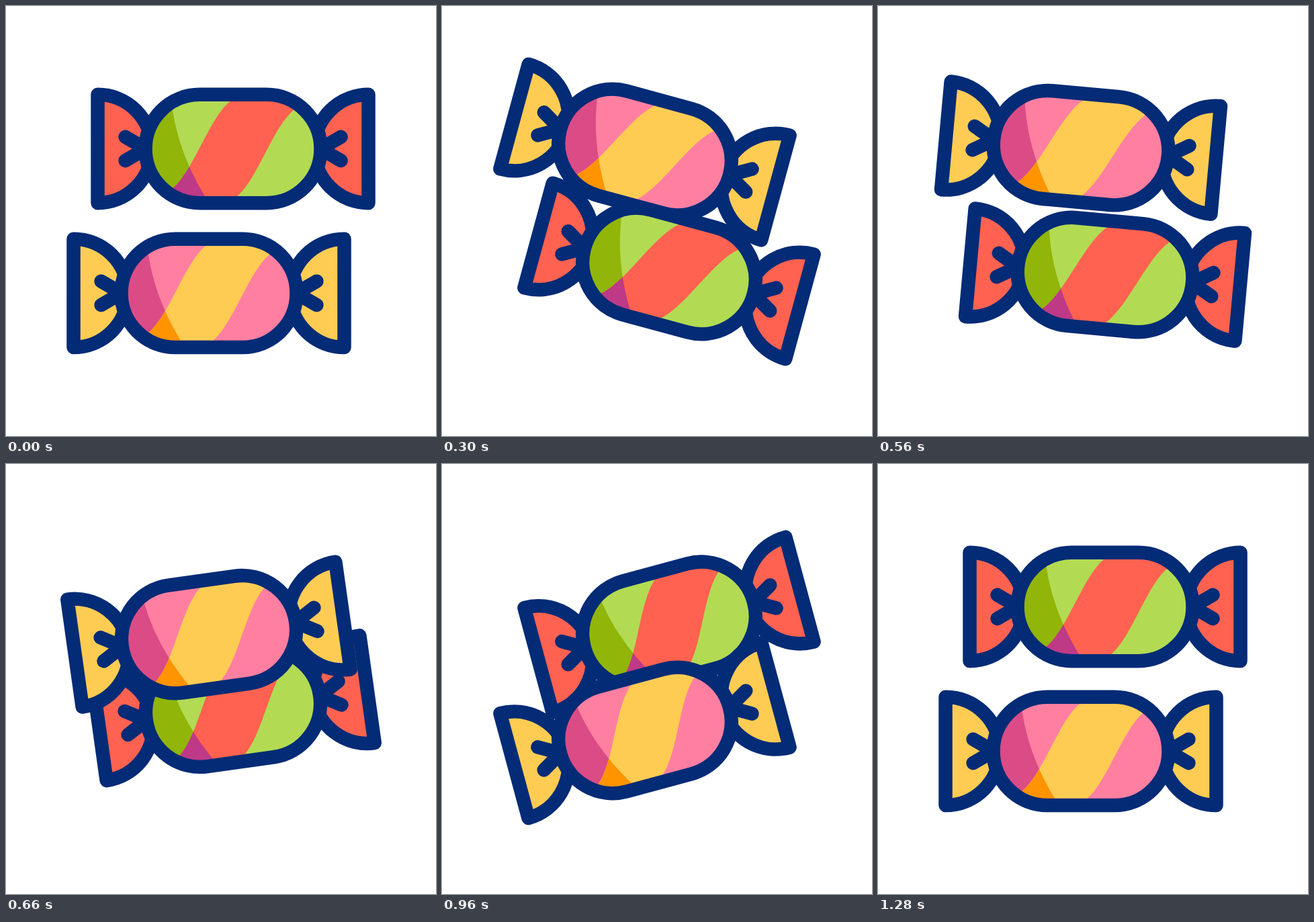
Animation of 640 by 640 pixels, one loop 1400 ms. Source, as an HTML page:

```html
<!DOCTYPE html>
<html lang="en">
<head>
<meta charset="utf-8">
<title>Candies</title>
<style>
  html, body { margin: 0; width: 100%; height: 100%; overflow: hidden; background: #fff; }
  svg { position: absolute; inset: 0; width: 100%; height: 100%; }
  .line { stroke: #042b76; stroke-width: 20.5; stroke-linecap: round; stroke-linejoin: round; }
  .none { fill: none; }

  .red    { --wrap: #ff6250; --base: #b2db53; --dark: #91b508; --mix: #be3a86; animation: stack 1.4s step-end infinite; }
  .yellow { --wrap: #ffcc53; --base: #ff7fa1; --dark: #db4b86; --mix: #ff9300; z-index: 1; }
  .wrap { fill: var(--wrap); }
  .base { fill: var(--base); }
  .dark { fill: var(--dark); }
  .mix  { fill: var(--mix); }

  .candy, .swirl {
    animation-duration: 1.4s;
    animation-iteration-count: infinite;
    animation-timing-function: cubic-bezier(.3333, 0, .6667, 1);
  }
  .red .candy    { animation-name: red-move, sway; }
  .yellow .candy { animation-name: yellow-move, sway; }
  .swirl { animation-name: slide; animation-timing-function: linear; }

  @keyframes red-move {
    0%, 80%, 100% { translate: 338px 212.5px; }
    28.5714% { translate: 338px 427.5px; }
  }
  @keyframes yellow-move {
    0%, 80%, 100% { translate: 302px 427.4px; }
    28.5714% { translate: 302px 179.5px; }
  }
  @keyframes sway {
    0%, 90%, 100% { rotate: 0deg; }
    28.5714% { rotate: 18deg; }
    57.1429%, 61.4286% { rotate: -18deg; }
  }
  @keyframes slide {
    0% { translate: 0 0; }
    91.4286%, 100% { translate: 3px 0; }
  }
  @keyframes stack {
    0% { z-index: 2; }
    28.5714%, 100% { z-index: 0; }
  }
</style>
</head>
<body>
<svg width="0" height="0" viewBox="0 0 640 640" aria-hidden="true">
  <defs>
    <rect id="pill" x="-130.5" y="-80.7" width="261" height="161.4" rx="80.7"/>
    <path id="stripe" d="M15-88L-5-70.5C-37-43-58 31.5-90 59L-110 76L-15 89L5 72C37 44.5 58-30 90-57.5L110-75Z"/>
    <path id="shade" d="M-140-90L-93-75L-90-57Q-80 8-42 70.5L-35 82L-140 90Z"/>
    <path id="wing" d="M-201.5-80.7A80.7 80.7 0 0 1-201.5 80.7Z"/>
    <path id="knot" d="M-160.5-17.7L-130 0L-160.5 17.7"/>
    <clipPath id="in-pill"><use href="#pill"/></clipPath>
    <clipPath id="in-shade"><use href="#shade"/></clipPath>
  </defs>
</svg>
<script>
  const end = flip => `
    <g transform="scale(${flip} 1)">
      <use href="#wing" class="line wrap"/>
      <use href="#knot" class="line none"/>
    </g>`;

  const candy = name => `
    <svg class="${name}" viewBox="0 0 640 640">
      <g class="candy">
        ${end(1)}${end(-1)}
        <use href="#pill" class="base"/>
        <g clip-path="url(#in-pill)">
          <g class="swirl">
            <use href="#shade" class="dark"/>
            <use href="#stripe" class="wrap"/>
            <g clip-path="url(#in-shade)"><use href="#stripe" class="mix"/></g>
          </g>
        </g>
        <use href="#pill" class="line none"/>
      </g>
    </svg>`;

  document.body.insertAdjacentHTML('beforeend', candy('red') + candy('yellow'));
</script>
</body>
</html>
```
